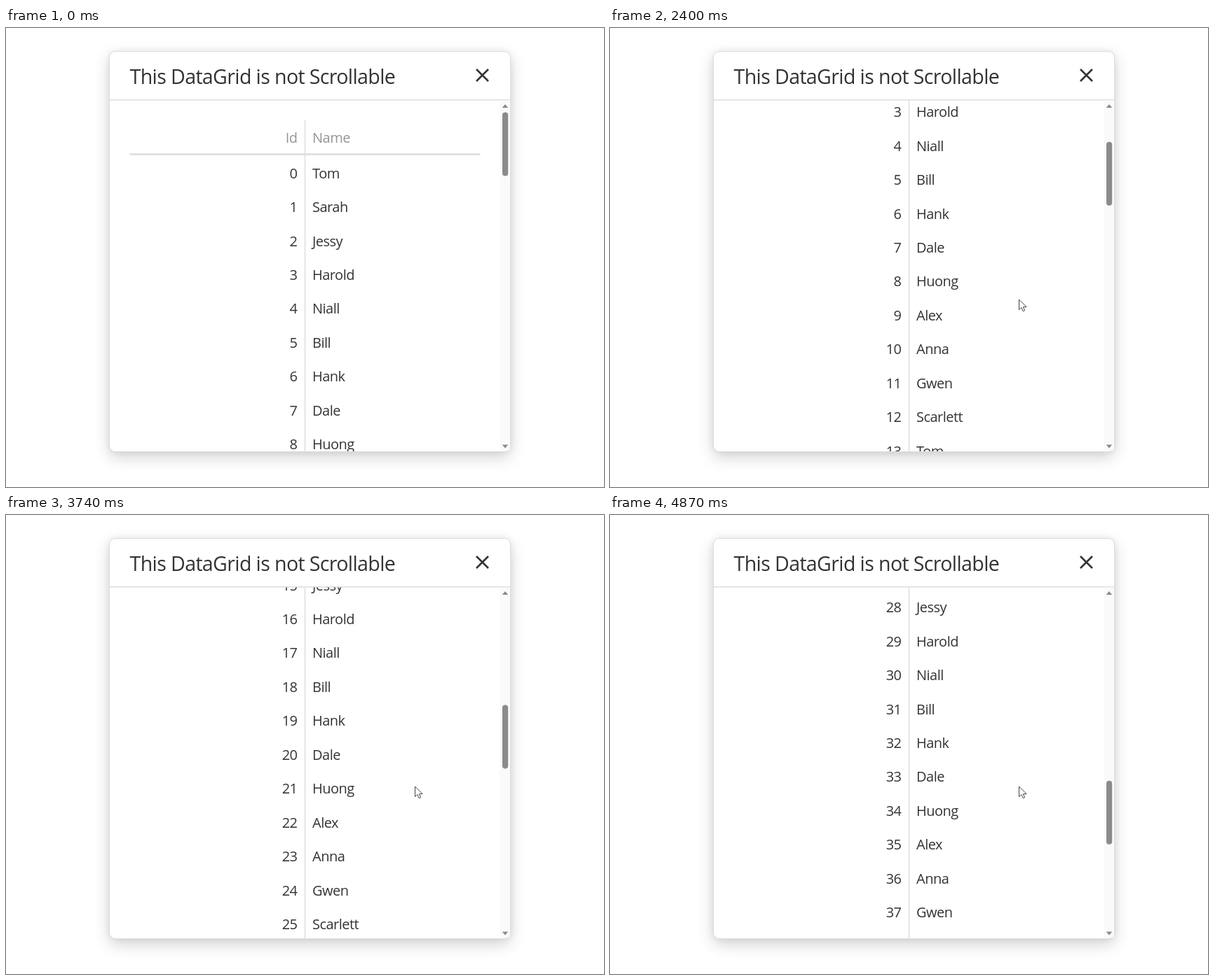
These frames come from a looping animation (853x656 px, 7670 ms). An HTML page:

```html
<!DOCTYPE html>
<html lang="en">
<head>
<meta charset="utf-8">
<title>Popup with a scrolling grid</title>
<style>
  html, body { margin: 0; width: 100%; height: 100%; overflow: hidden; background: #fff; }
  #popup {
    position: absolute; left: 147px; top: 32.5px; width: 573px; height: 573.5px;
    box-sizing: border-box; border: 1.4px solid #ddd; border-radius: 9px; background: #fff;
    box-shadow: 0 0 10px rgba(0, 0, 0, .07), 0 8px 22px rgba(0, 0, 0, .17);
  }
  svg { position: absolute; left: 0; top: 0; }
  text { font: 19.95px "Open Sans", "Noto Sans", sans-serif; letter-spacing: -.024em; fill: #333; }
  .title { font-size: 28.5px; letter-spacing: -.021em; }
  .head { fill: #959595; }
  .id { text-anchor: end; }
  .line { stroke: #ddd; stroke-width: 1.4; }
  .bar { fill: #8b8b8b; }
</style>
</head>
<body>
<div id="popup"></div>
<svg width="853" height="656" viewBox="0 0 853 656">
  <clipPath id="view"><rect x="148" y="103.5" width="571" height="501.5"/></clipPath>
  <text class="title" x="176.5" y="79.8">This DataGrid is not Scrollable</text>
  <path d="M671 59l17 17m0-17l-17 17" stroke="#333" stroke-width="2.6"/>
  <path class="line" d="M148 102.8H719"/>
  <g clip-path="url(#view)">
    <g id="grid">
      <path class="line" d="M426.5 132V2700"/>
      <path d="M176.5 180.5H676.5" stroke="#ddd" stroke-width="2.4"/>
      <text class="head id" x="415.5" y="164">Id</text>
      <text class="head" x="437" y="164">Name</text>
    </g>
  </g>
  <rect x="704.5" y="103.5" width="14" height="500" fill="#fafafa"/>
  <path class="bar" d="M707.7 114l4.3-5 4.3 5zM707.7 595.5l4.3 5 4.3-5z"/>
  <rect id="thumb" class="bar" x="708" y="120.5" width="8.2" height="91" rx="4"/>
  <path id="cursor" d="M0 0V14.6L3.4 11.5 5.7 16.8 8.1 15.7 5.9 10.6H10.6Z"
        fill="#fff" stroke="#444" stroke-width="1" stroke-linejoin="round"/>
</svg>
<script>
const LOOP = 7670, TICK = 200 / 3;
const ROW = 48.45, NOTCH = 75.37, ROWS = 50;
const NAMES = ["Tom", "Sarah", "Jessy", "Harold", "Niall", "Bill", "Hank", "Dale",
               "Huong", "Alex", "Anna", "Gwen", "Scarlett"];
// Wheel bursts: start and end in ticks, notches scrolled
const BURSTS = [[23.5, 32, 3], [35.5, 42, 3], [44.5, 53, 5], [55.6, 63, 4], [66, 73, 4]];

const [grid, thumb, cursor] = ["grid", "thumb", "cursor"].map(id => document.getElementById(id));
const progress = (k, from, to) => Math.min(1, Math.max(0, (k - from) / (to - from)));
const wheelEase = p => 1 - (1 - p ** 1.8) ** 3;

function addText(content, x, y, className) {
  const text = document.createElementNS(grid.namespaceURI, "text");
  text.setAttribute("x", x);
  text.setAttribute("y", y);
  text.setAttribute("class", className);
  text.textContent = content;
  grid.append(text);
}

for (let i = 0; i < ROWS; i++) {
  const y = 214.6 + i * ROW;
  addText(i, 415.5, y, "id");
  addText(NAMES[i % NAMES.length], 437, y, "name");
}

function draw(now) {
  // The picture advances at 15 steps per second, on a 10 ms clock
  const time = Math.floor((now % LOOP) / 10) * 10;
  const k = Math.floor(time / TICK + 1e-6);
  const scroll = BURSTS.reduce(
    (sum, [from, to, notches]) => sum + notches * NOTCH * wheelEase(progress(k, from, to)), 0);
  grid.setAttribute("transform", `translate(0 ${-scroll})`);
  thumb.setAttribute("y", 120.5 + scroll * .181);

  const move = 1 - (1 - progress(k, 17, 24)) ** 2;
  cursor.setAttribute("transform", `translate(${837.5 - 254 * move} ${385 + 3 * move})`);
  cursor.setAttribute("visibility", k < 17 ? "hidden" : "visible");
}

function loop() {
  draw(performance.now());
  requestAnimationFrame(loop);
}
loop();
</script>
</body>
</html>
```
